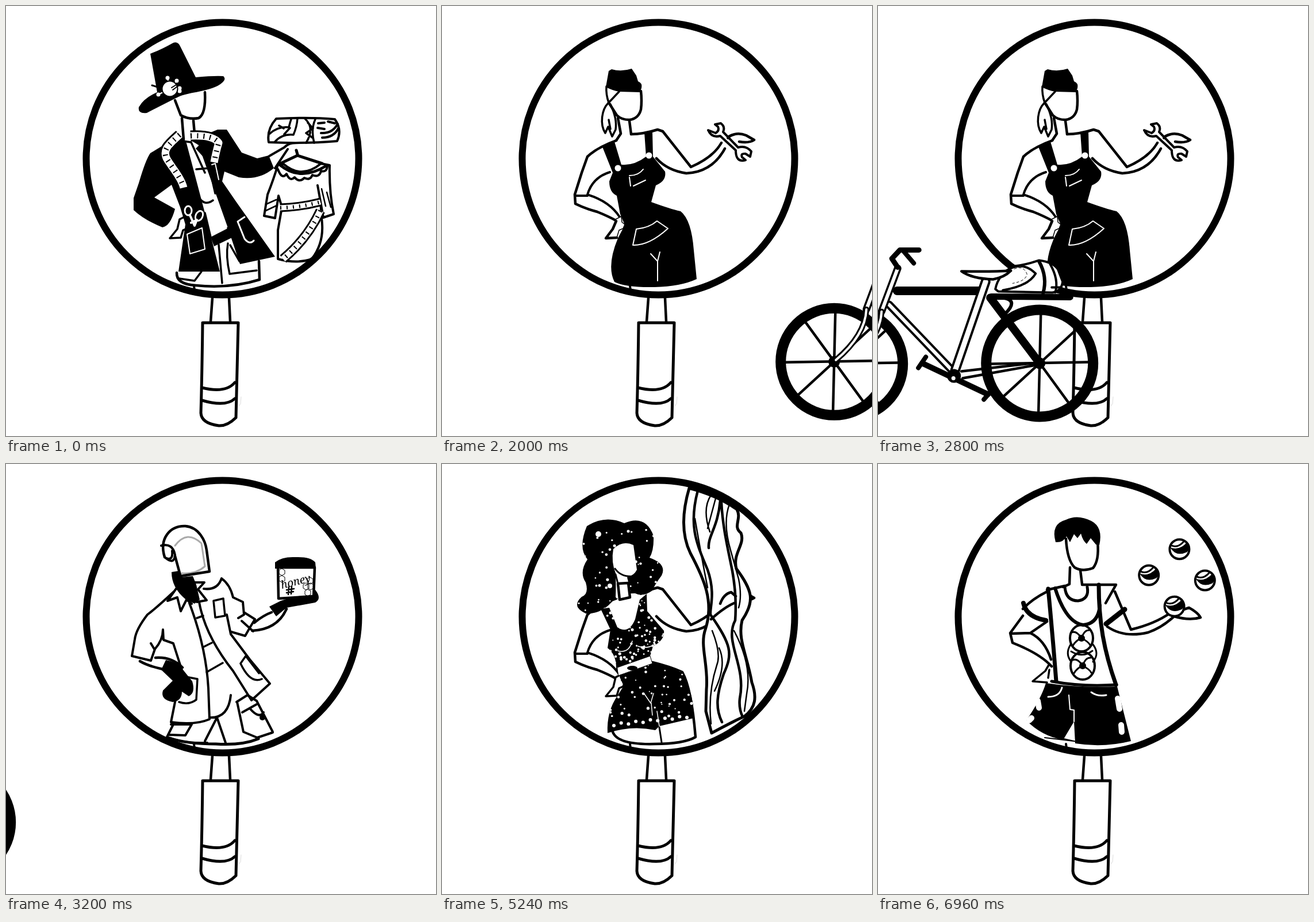
Animation, 748 px wide and 748 px high, one loop 7000 ms. Source, as an HTML page:

```html
<!DOCTYPE html>
<html lang="en">
<head>
<meta charset="utf-8">
<style>
html, body { margin: 0; width: 100%; height: 100%; overflow: hidden; background: #fff; }
svg { display: block; width: 100vw; height: 100vh; stroke-linecap: round; stroke-linejoin: round; }
</style>
</head>
<body>
<svg id="stage" viewBox="0 0 748 748"></svg>
<script>
const line = (d, w = 4.5, c = '#000') => `<path d="${d}" fill="none" stroke="${c}" stroke-width="${w}"/>`;
const white = (d, w = 2) => line(d, w, '#fff');
const ink = d => `<path d="${d}"/>`;
const paper = (d, w = 4) => `<path d="${d}" fill="#fff" stroke="#000" stroke-width="${w}"/>`;
const dot = (x, y, r, c = '#fff') => `<circle cx="${x}" cy="${y}" r="${r}" fill="${c}"/>`;
const ring = (x, y, r, w, fill = 'none') =>
  `<circle cx="${x}" cy="${y}" r="${r}" fill="${fill}" stroke="#000" stroke-width="${w}"/>`;
const tube = (d, w, inner) => line(d, w) + white(d, inner);
const group = (id, body) => `<g id="${id}">${body}</g>`;

// Striped band along a path
const tape = (d, w, step = 9) => `<g stroke-linecap="butt" fill="none">
  <path d="${d}" stroke="#000" stroke-width="${w + 6}"/><path d="${d}" stroke="#fff" stroke-width="${w}"/>
  <path d="${d}" stroke="#000" stroke-width="${w * .7}" stroke-dasharray="2 ${step}"/></g>`;

let seed = 7;
const rnd = () => (seed = seed * 16807 % 2147483647) / 2147483647;
function speckles(x, y, w, h, n) {
  let s = '';
  while (n--) s += dot((x + rnd() * w).toFixed(1), (y + rnd() * h).toFixed(1), (1 + rnd() * 1.6).toFixed(1));
  return s;
}
const spotted = (id, d, ...area) => `<clipPath id="${id}"><path d="${d}"/></clipPath>${ink(d)}
  <g clip-path="url(#${id})">${speckles(...area)}</g>`;

const face = line('M290 168L304 190Q312 198 326 198Q342 196 346 180Q348 165 346 148')
  + line('M306 195L311 222L303 234M326 200L329 223');
const hand = paper('M302 371L312 366L313 376L318 380L315 387L308 390L304 403L285 404L298 388Z', 3.5);
const leftArm = line('M303 234Q270 246 253 262L243 290L231 328L232 344Q248 352 270 358Q290 366 304 374')
  + line('M292 289Q262 298 253 328Q292 340 309 367M232 330L253 330', 4);
const rightArm = line('M329 223Q350 223 375 215L384 218L433 280Q472 263 486 238M373 265Q392 286 425 291Q470 289 492 248')
  + line('M496 229Q512 218 529 225L543 233Q534 239 517 236');
const hips = line('M366 345Q395 352 418 362Q434 390 441 475Q420 487 370 487Q300 489 296 462');

const lens = ring(376.5, 265.5, 237, 12) + line('M327 487L328 495', 4)
  + line('M359 508L356 549M388 508L390 549')
  + line('M342 551L404 551Q402 620 400 716Q385 731 370 730Q340 726 339 708Q341 640 342 551', 5)
  + line('M341 664Q382 674 398 655M341 686Q382 698 398 683', 5)
  + line('M409 680L408 692L404 697', 1, '#ddd');

const pin = (x, y) => white(`M285 144L${x} ${y}`, 2) + dot(x, y, 3.5);
const tailor = line('M294 164L304 190Q318 198 335 195Q348 188 346 150') + line('M306 195L309 232M326 199L328 222')
  + hand + line('M297 464Q296 484 330 486Q390 492 441 476L440 444')
  + line('M301 474L328 478L340 462M370 415L376 482M386 413Q382 435 389 466L436 460M390 416L406 444', 3.5)
  + ink('M300 226L251 256Q243 267 231 308L222 334L222 355Q240 372 272 385Q286 383 294 353L258 333L288 311L303 350L312 380L300 462L372 462L346 360L313 235Z')
  + ink('M322 234L368 215L384 215Q397 235 410 255L437 265L457 260L466 282Q440 304 405 298L380 288L376 305L400 340L468 436L407 449L386 386L335 242Z')
  + ink('M356 402L389 385L395 402L362 418Z') + ink('M296 265L316 251L317 278Z') + ink('M330 248L349 269L338 240Z')
  + line('M308 235L322 237L346 290M331 284L354 282L364 326M335 332Q345 349 360 338M346 360L356 402M386 386L394 400', 3.5)
  + tape('M302 224C284 240 270 251 281 268C292 285 305 300 309 316', 13)
  + tape('M321 226Q360 224 370 238Q365 255 362 272', 13)
  + line('M358 276L364 274L370 302', 2, '#fff')
  + `<g fill="none" stroke="#fff" stroke-width="3"><ellipse cx="317" cy="356" rx="6" ry="8"/><ellipse cx="336" cy="365" rx="6" ry="9" transform="rotate(25 336 365)"/></g>`
  + white('M320 364L328 382L332 372L322 377', 4) + white('M315 397L341 386L346 423L320 431Z')
  + white('M415 367L403 375L415 405Q424 416 431 408', 3)
  + ink('M251 83Q270 76 291 64Q299 61 303 70L330 124Q362 121 378 122Q386 129 368 139C344 150 318 150 300 158Q270 173 245 186Q229 188 231 176Q240 160 263 150Z')
  + [[281, 125], [297, 130], [302, 143], [265, 154], [302, 148]].map(q => pin(...q)).join('')
  + line('M254 138L270 143', 3) + ring(285, 144, 13.5, 2, '#fff') + line('M288 142L298 136M290 146L298 140', 2)
  + line('M458 261L484 246Q492 238 504 238M468 282L490 249', 4)
  + paper('M470 196Q530 193 572 197Q585 215 576 235Q520 240 457 237Q453 215 470 196Z')
  + line('M459 222Q473 209 492 211Q494 203 496 197M468 236Q480 222 500 224Q506 210 507 196M475 208L483 213M484 223L494 212M520 196Q538 212 522 238M538 197Q530 215 536 238M525 203L534 213L522 221L533 229', 3.5)
  + line('M543 204L554 203M550 229Q570 229 578 213M548 221Q568 222 577 205M542 212L554 214M560 201L572 204', 4)
  + paper('M473 276Q466 300 455 328L449 365L468 369L474 330L480 350L473 390L473 440Q506 449 532 440Q552 414 550 380L547 340L542 312L552 368L570 362Q562 324 563 277L548 274Q514 302 483 275Z')
  + line('M475 275L507 260L550 274M507 258L505 251M476 276Q512 306 557 278', 5)
  + line('M473 284Q480 303 488 292Q494 306 502 298Q510 308 519 299Q529 304 533 294Q545 299 548 287Q558 290 559 278', 4)
  + tape('M477 351Q512 350 547 341', 9) + tape('M547 356C532 388 512 415 482 440', 11)
  + line('M452 345L470 337M452 356L471 347M549 318L556 348M558 324L565 350', 2.5);

const mechanic = face + leftArm + rightArm
  + ink('M279 245L300 236L312 276Q334 278 355 262L352 220L366 219L367 262L388 288Q391 304 372 312L364 341Q397 353 415 357Q434 372 438 425L443 475Q415 488 370 489Q320 490 300 480Q286 452 306 404L318 381L310 362L304 330Q291 324 291 305L297 290Z')
  + paper('M302 371L312 366L313 376L318 380L315 387L308 390L304 403L285 404L298 388Z', 1.5) + line('M303 374L297 388L285 404L304 403')
  + dot(306, 282, 5.5) + dot(360, 260, 5.5)
  + white('M326 295Q342 295 350 284M326 298L328 313M333 313L354 303M338 388L332 416Q360 417 393 387L374 374Q360 386 338 388M363 431L375 444L379 428M375 444L375 478')
  + ink('M290 113L295 110Q312 115 330 109L338 121L341 131Q349 134 347 143L344 150L308 149Q294 146 285 141Z')
  + line('M286 140Q285 154 290 168M308 149L292 166M289 169C278 180 274 205 284 221L289 210L296 227L302 215Q305 196 293 171M290 198L293 214', 3.5)
  + paper('M463 216L476 221Q483 217 480 210L475 206L485 204Q493 210 489 219L515 246Q529 242 538 253L536 262L528 257Q519 256 522 263L528 268Q511 273 511 251L484 226Q469 230 463 216Z')
  + ring(498, 229, 2, 2);

const wheel = (x, y) => ring(x, y, 93, 18) + dot(x, y, 10, '#000')
  + line(`M${x + 2} ${y - 84}L${x - 2} ${y + 84}M${x - 84} ${y + 1}L${x + 84} ${y - 2}M${x - 50} ${y - 69}L${x + 49} ${y + 67}M${x + 61} ${y - 56}L${x - 62} ${y + 57}`, 4.5);
const bike = wheel(243, 621) + wheel(574, 620)
  + line('M326 494L475 494', 15) + tube('M312 518L425 636', 14, 6) + tube('M480 478L427 632', 17, 9)
  + tube('M327 455L299 530', 13, 6) + tube('M299 530Q297 575 246 618', 10, 4)
  + line('M364 423L331 423L317 438L327 453', 9) + line('M338 426L355 446', 8)
  + line('M488 506L574 620', 14) + line('M438 634L570 619M440 646L574 622')
  + line('M510 506Q538 510 514 534', 6) + line('M490 504L627 505', 11)
  + paper('M497 491Q502 464 530 451Q550 449 573 441Q598 444 606 457L614 478Q612 495 596 497L502 495Z', 4)
  + line('M516 459Q544 441 567 464Q554 486 510 493', 4)
  + `<path d="M530 456Q546 449 552 465Q550 477 527 481" fill="none" stroke="#000" stroke-dasharray="4 4"/>`
  + line('M573 443Q588 470 580 498', 6) + line('M592 447Q608 475 601 497M595 488L612 488', 4)
  + paper('M438 460Q490 461 524 459Q512 471 493 474Q456 473 438 460Z', 4.5)
  + line('M370 620L484 674', 10) + line('M376 609L363 628M491 667L477 683', 8)
  + dot(425, 642, 12, '#000') + dot(424, 646, 3.5);

const hex = (x, y) => line(`M${x} ${y - 6}l5 3v6l-5 3l-5 -3v-6z`, 1);
const beekeeper = line('M294 142Q315 114 340 138L346 178Q330 192 306 190', 3, '#aaa')
  + line('M276 162C266 130 285 107 312 108C336 110 347 134 349 150L354 187L304 195M294 160L303 193')
  + line('M270 142Q290 137 294 158Q293 176 277 163Q291 170 289 151', 4)
  + ink('M288 188L300 186L305 197L325 195L331 210L337 236L328 243L312 235Q288 215 288 188Z')
  + line('M298 214L281 238L298 232L304 256L314 236L323 243M325 206L345 206L334 218L349 237L332 240', 4)
  + line('M292 222Q262 250 246 262Q226 288 224 305L219 334L252 342L259 322Q273 306 273 288L274 306L291 312L307 362M258 322L252 312M319 242Q348 318 352 390L354 444Q328 455 287 449L296 404', 4)
  + line('M336 240Q346 298 395 360L427 411L459 382L424 340L391 296L384 262M344 217Q368 220 375 199Q390 210 395 232L412 240L414 262L404 268M414 258L433 270L424 285L416 299L392 292M410 273L430 291', 4)
  + line('M361 238L378 234L381 264L364 267ZM408 347L417 334L440 364M408 347Q425 383 445 374M312 370L333 374L331 410Q318 420 301 414M332 268L343 264M344 318L358 311M349 362L377 346', 3.5)
  + line('M355 441Q387 442 391 402M360 441L367 441L346 482M367 441L382 485M401 414L420 402L436 412L464 466M402 414L413 466L437 476L464 467M411 432L436 418M424 425Q440 444 448 432M291 453L280 475Q310 487 350 485M287 453L323 453L312 472L283 471', 4)
  + line('M285 477Q315 487 365 487Q410 490 439 478', 5) + dot(446, 441, 5, '#000')
  + line('M233 343Q246 351 273 357M260 337Q288 335 307 354')
  + ink('M278 341Q298 344 308 358L324 378Q330 398 318 404L306 396Q306 412 290 414Q268 410 273 394L290 377L270 358Z')
  + line('M432 276Q448 263 462 258M428 290Q472 288 488 252') + ink('M458 248L478 238L538 219Q550 234 538 241L488 250L470 265Z')
  + paper('M473 180L474 234L535 230L537 180Z', 4.5)
  + ink('M468 171Q480 161 503 162Q530 161 538 171L539 182L468 182Z')
  + [[480, 188], [480, 200], [529, 203], [522, 213], [530, 213], [525, 224]].map(q => hex(...q)).join('')
  + `<text x="504" y="211" text-anchor="middle" transform="rotate(-14 504 205)" font-family="'Noto Serif', serif" font-style="italic" font-size="19">honey</text>`
  + line('M492 214L491 227M497 213L496 226M488 219L501 217M488 224L500 222', 2.5);

const curtain = paper('M430 42Q410 110 432 155C456 200 474 240 458 288C448 316 464 350 460 392L459 430L469 468Q510 446 526 439C546 424 548 405 539 380C530 330 514 305 522 272C545 238 540 220 512 182C505 155 528 140 520 120C505 108 522 96 513 79Q480 55 430 42Z', 5)
  + line('M445 46C428 110 444 140 462 184C476 224 466 250 467 260M467 262C504 315 506 330 490 365C478 400 475 425 487 449M484 64C480 110 462 126 464 146M486 66C488 110 498 150 505 186Q513 230 510 272C490 310 530 350 518 408Q516 425 523 440')
  + line('M468 54Q452 78 466 118M477 56L462 112M500 70Q488 102 502 150L516 200Q522 230 516 250M470 290Q486 330 478 350Q462 400 468 452M508 290Q540 350 530 400L526 430M462 215Q452 165 440 95M482 320Q496 350 474 395', 2.5);

const hem = [...Array(11)].map((_, i) => dot(299 + i * 12.7, 455 - 14 * i / 10 - (i % 2) * 3, 3)).join('');
const dancer = leftArm + rightArm + hips + hand
  + spotted('hair', 'M252 108Q284 88 317 103Q354 87 368 125Q369 150 361 163Q392 174 382 194Q370 210 366 220Q350 232 336 225L303 207L302 232Q280 262 250 260Q224 248 243 231Q256 226 250 206Q238 188 253 166Q236 146 252 108Z', 238, 95, 145, 160, 60)
  + ink('M356 222L346 228L336 224Z') + dot(272, 122, 5) + dot(292, 212, 4)
  + `<path d="M298 148Q314 132 333 141L339 184Q334 194 322 197L328 222L303 234L302 190Q294 170 298 148Z" fill="#fff"/>`
  + line('M301 182Q312 198 335 195M302 192L306 208', 3) + paper('M306 208L324 207L327 232L309 236Z', 4.5)
  + spotted('top', 'M276 252L291 250L305 284Q325 297 336 270L344 236L356 226L357 256L386 290Q388 306 367 317L362 334L366 348L303 358Q304 332 288 320L293 288Z', 285, 225, 105, 130, 130)
  + white('M306 325Q325 330 331 308M341 317Q355 322 368 315', 1.5)
  + spotted('shorts', 'M308 368L366 347Q409 351 421 368Q438 402 438 442L378 456L371 463Q330 454 288 468Q286 430 306 402L316 386Z', 290, 350, 148, 90, 55)
  + hem + white('M352 400L363 416L368 399M364 416L366 437M374 430L378 456', 1.5)
  + paper('M305 354L362 334L366 347L307 368Z', 1) + `<ellipse cx="331" cy="355" rx="9" ry="4"/>`
  + line('M378 458L382 484', 3)
  + '<use href="#drape"/>' + line('M468 270Q490 250 508 242M484 243Q490 226 503 223L511 230', 4.5);

const fan = (x, y, rx, ry) => `<ellipse cx="${x}" cy="${y}" rx="${rx}" ry="${ry}" fill="none" stroke="#000" stroke-width="4"/>`
  + dot(x, y, 6, '#000') + line(`M${x} ${y}Q${x - 9} ${y - 14} ${x - 17} ${y - 10}M${x} ${y}Q${x + 5} ${y - 15} ${x + 14} ${y - 14}M${x} ${y}Q${x - 10} ${y + 4} ${x - 15} ${y + 13}M${x} ${y}Q${x + 12} ${y + 6} ${x + 15} ${y + 12}`, 3);
const juggler = line('M327 130Q329 167 342 180Q356 188 374 181Q385 168 382 136M334 180L333 209L322 214M352 185L355 209')
  + ink('M309 136Q300 104 327 97Q347 87 371 99Q392 110 385 141L379 140L370 129L363 139Q356 133 353 121L347 129L341 122L334 136L328 126Q322 137 309 136Z')
  + line('M294 222Q268 235 252 252M252 264L230 294L234 311Q282 330 302 352M294 274L265 294Q290 306 301 340M231 295L265 294')
  + line('M298 348L291 360L269 378L294 380M298 358L296 372', 3.5)
  + line('M253 242Q258 266 292 272', 8) + line('M296 217Q304 300 310 378', 7) + line('M384 210C384 275 393 325 414 384', 7)
  + line('M325 214Q327 238 348 238Q368 235 364 214', 5) + line('M308 216Q327 276 357 280Q383 278 386 246', 6)
  + line('M294 219L325 212M355 210L414 210L396 242M412 222L440 288Q482 278 510 258M399 283Q428 303 470 293Q495 284 515 265M514 259L541 250Q556 258 561 267Q542 273 515 265')
  + line('M397 278L429 253', 9) + line('M302 378Q355 388 415 384', 5)
  + fan(354, 303, 20, 23) + fan(356, 351, 21, 24) + line('M335 314Q325 330 336 344M374 314Q386 330 374 344M336 326Q355 338 373 325', 3)
  + ink('M292 381Q350 390 416 387L440 482Q392 494 343 486L341 448L322 480Q284 473 258 446Q284 408 292 381Z')
  + line('M290 476L340 482M323 478L345 483', 2)
  + white('M296 405Q316 405 320 389M371 397Q382 405 397 402', 3) + white('M332 402L334 427L341 428L341 448', 2)
  + white('M278 412L280 424M267 442L263 446M417 408L420 426M423 454L424 466', 10);
const ball = ring(0, 0, 17, 4, '#fff') + ink('M-16 -3Q0 3 13 -12Q20 -2 13 5Q-6 14 -16 -3Z') + line('M-13 -6Q-2 -2 8 -14', 3);
const bee = '<ellipse rx="10" ry="6"/>' + white('M-3 -5L-3 5M3 -5L3 5') + paper('M0 -6Q-9 -20 -2 -19Q5 -17 1 -6Q12 -20 11 -12Q10 -7 1 -6Z', 1.5);

const uses = (id, name, n) => group(id, `<use href="#${name}"/>`.repeat(n));
const scenes = { tailor, mechanic, beekeeper, dancer, juggler };
document.getElementById('stage').innerHTML =
  `<defs>${group('drape', curtain)}${group('ball', ball)}${group('bee', bee)}</defs>`
  + Object.entries(scenes).map(e => group(...e)).join('') + lens
  + group('bike', bike) + uses('bees', 'bee', 12) + uses('drapes', 'drape', 4) + uses('balls', 'ball', 4);

const el = id => document.getElementById(id);
const show = (id, on) => el(id).setAttribute('display', on ? 'inline' : 'none');
const place = (node, x, y, more = '') => node.setAttribute('transform', `translate(${x} ${y})${more}`);
const starts = { tailor: 0, mechanic: 1000, beekeeper: 3200, dancer: 5240, juggler: 5920 };

function draw(t) {
  const current = Object.keys(starts).filter(k => t >= starts[k]).pop();
  for (const k in starts) show(k, k === current);

  show('bike', t >= 2000 && t < 3240);
  place(el('bike'), (2480 - t) * .915, (t - 2480) * .0045);

  show('bees', t >= 3200 && t < 4000);
  [...el('bees').children].forEach((b, i) => {
    const x = 780 + i * 53 - (t - 3200) * 1.8;
    place(b, x, 30 + i * 227 % 590 + 14 * Math.sin(t / 90 + i));
  });

  show('drapes', t >= 4200 && t < 5240);
  const closed = Math.min(1, (t - 4160) / 600);
  [...el('drapes').children].forEach((d, i) => place(d, 124 - i * 114 * closed, -17, ' scale(1 1.075)'));

  show('balls', t >= 5920);
  [...el('balls').children].forEach((b, i) => {
    const a = (i / 4 + (t - 6960) / 1080) * 2 * Math.PI + .09;
    place(b, 520 + 49 * Math.cos(a), 198 + 50 * Math.sin(a));
  });
}

const begin = performance.now();
function tick() {
  draw(Math.floor((performance.now() - begin) % 7000 / 40) * 40);
  requestAnimationFrame(tick);
}
tick();
</script>
</body>
</html>
```
